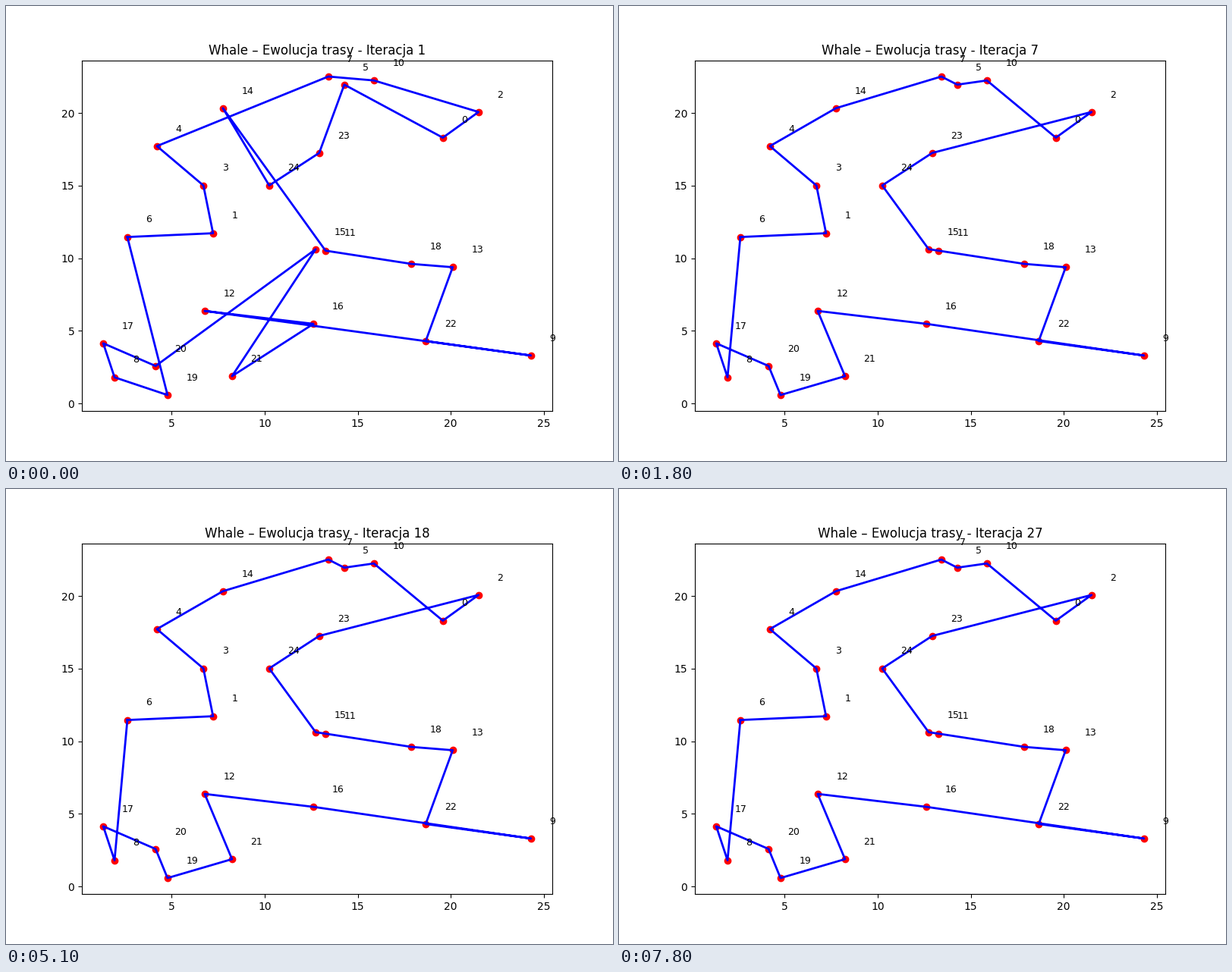
Write a matplotlib script that moves like this. It is 800x600 px and loops after 8 s.

```python
import matplotlib.pyplot as plt
from matplotlib.animation import FuncAnimation

INTERVAL = 100
FRAMES = 80
FRAMES_PER_ITERATION = 3
LABEL_OFFSET = 1

# Key points, listed in the order of the first tour
CITIES = {
    6: (2.61, 11.46), 1: (7.22, 11.72), 3: (6.70, 15.01), 4: (4.20, 17.72),
    7: (13.42, 22.51), 10: (15.87, 22.24), 2: (21.50, 20.07), 0: (19.58, 18.30),
    5: (14.28, 21.95), 23: (12.93, 17.25), 24: (10.24, 15.01), 14: (7.75, 20.33),
    11: (13.27, 10.52), 18: (17.88, 9.61), 13: (20.11, 9.38), 22: (18.66, 4.30),
    9: (24.318, 3.30), 12: (6.77, 6.37), 16: (12.62, 5.48), 21: (8.24, 1.88),
    15: (12.74, 10.62), 20: (4.13, 2.58), 17: (1.314, 4.14), 8: (1.92, 1.80),
    19: (4.77, 0.58),
}

# Improvements per iteration: each city moves to right after another one
MOVES = {
    2: {14: 1, 15: 24, 16: 21, 19: 16},
    3: {4: 14, 5: 7, 0: 10, 16: 9},
    7: {3: 1, 4: 3},
}


def tour_at(iteration):
    tour = list(CITIES)
    for start, moves in MOVES.items():
        if start <= iteration:
            for city, previous in moves.items():
                tour.remove(city)
                tour.insert(tour.index(previous) + 1, city)
    return tour


def closed_path(tour):
    return zip(*(CITIES[city] for city in tour + tour[:1]))


fig, ax = plt.subplots(figsize=(8, 6), dpi=100)
ax.scatter(*zip(*CITIES.values()), c="red")
for city, (x, y) in CITIES.items():
    ax.text(x + LABEL_OFFSET, y + LABEL_OFFSET, str(city), fontsize=9)
route, = ax.plot([], [], "b-", lw=2)
title = ax.set_title("")


def update(frame):
    iteration = frame // FRAMES_PER_ITERATION + 1
    route.set_data(*closed_path(tour_at(iteration)))
    title.set_text(f"Whale – Ewolucja trasy - Iteracja {iteration}")
    return route, title


anim = FuncAnimation(fig, update, frames=FRAMES, interval=INTERVAL,
                     repeat=True, repeat_delay=0)
plt.show()
```
